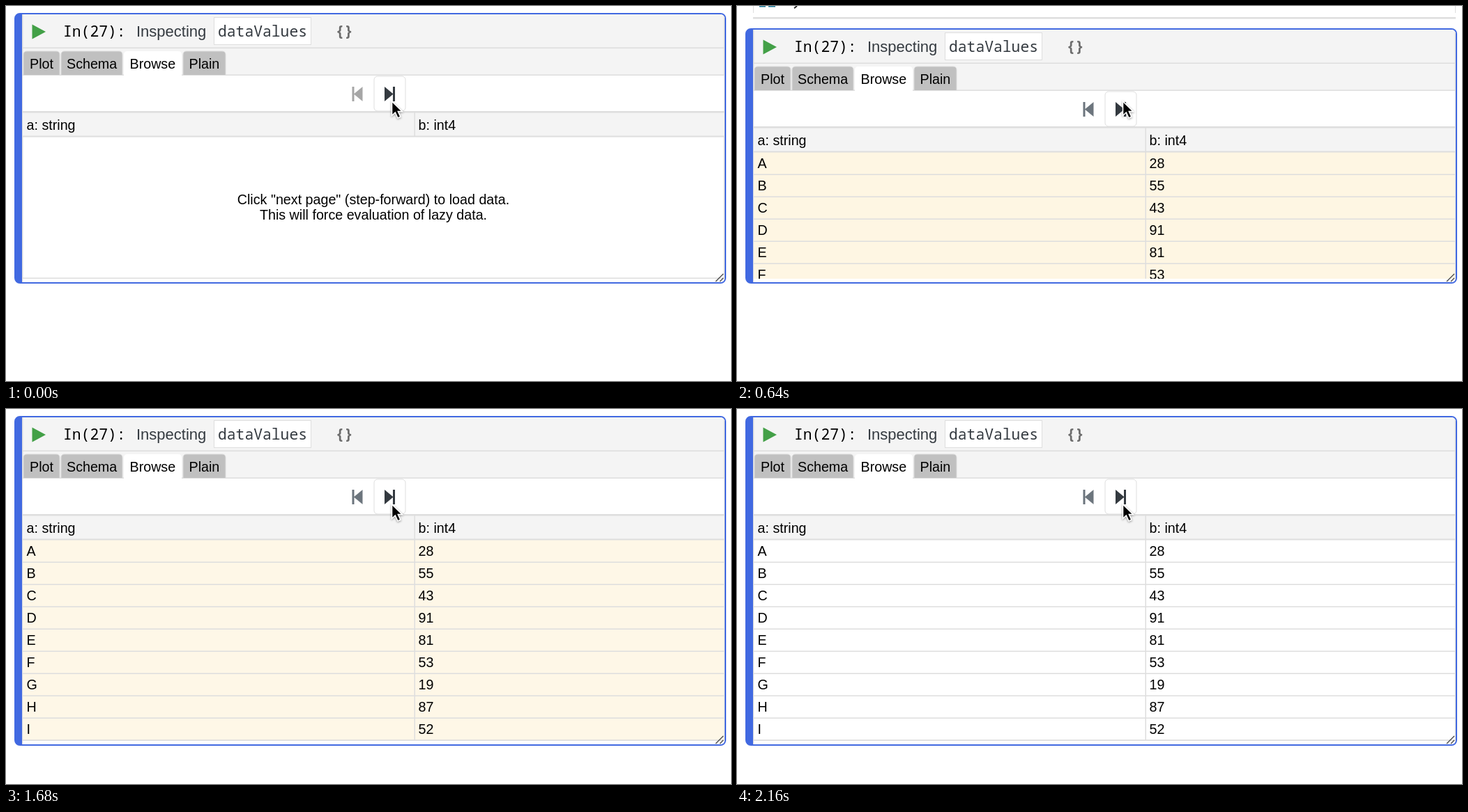
Write an HTML page that moves like this. It is 1040 px wide and 539 px high and loops after 4160 ms.

```html
<!DOCTYPE html>
<html lang="en">
<head>
<meta charset="utf-8">
<title>Data browser</title>
<style>
html, body { margin: 0; width: 100%; height: 100%; overflow: hidden; background: #fff; }
svg { position: absolute; left: 0; top: 0; font: 19.7px "Liberation Sans", Arial, sans-serif; }
#card {
  position: absolute; left: 12px; top: 10px; width: 1021px; box-sizing: border-box;
  border: 2px solid #4169e1; border-left-width: 11px; border-radius: 8px;
  overflow: hidden; background: #fff;
}
#card svg { left: -23px; top: -12px; }
.mono { font: 21.33px "Noto Sans Mono", "DejaVu Sans Mono", monospace; }
.line { fill: #dedede; }
.bar { fill: #f4f4f4; }
.dark { fill: #343a40; }
</style>
</head>
<body>
<svg id="above" width="1040" height="30">
  <path d="M23.5 0V10M1030.5 0V10" stroke="#ddd"/>
  <rect class="line" x="23" y="16" width="1008" height="2.5"/>
  <path d="M32 0H41M45 0H55" stroke="#1f7a99" stroke-width="3"/>
  <path d="M87 -3Q86 1 82 3" fill="none" stroke="#222" stroke-width="2"/>
</svg>

<div id="card"><svg width="1040" height="539">
  <rect class="bar" x="23" y="12" width="1010" height="88"/>
  <rect class="line" x="23" y="12" width="1.5" height="480"/>
  <rect class="line" x="1029.5" y="12" width="1.5" height="480"/>
  <rect class="line" x="23" y="59.5" width="1010" height="1.5"/>
  <path d="M37.5 26.5L57 37L37.5 47.5Z" fill="#43a047"/>
  <text class="mono" x="82" y="44">In(27):</text>
  <text class="dark" x="187" y="44" font-size="22">Inspecting</text>
  <rect x="298.5" y="16.5" width="139" height="39" fill="#fff" stroke="#dedede"/>
  <text class="mono dark" x="304" y="44">dataValues</text>
  <text class="mono" x="472.5" y="43" fill="#6c6c6c" style="font-weight:600">{}</text>

  <rect x="24" y="100" width="1006" height="53" fill="#fff"/>
  <rect class="line" x="23" y="98.5" width="1010" height="1.5"/>
  <g id="tabs"></g>

  <path id="back" d="M496.5 116H499.5V126L511.5 116V137L499.5 127V137H496.5Z"/>
  <rect id="button" x="528" y="101" width="45" height="50" rx="5"/>
  <path class="dark" d="M543 116L555 126V116H558V137H555V127L543 137Z"/>

  <rect class="bar" x="24" y="153" width="1006" height="35"/>
  <rect class="line" x="23" y="151" width="1010" height="2.5"/>
  <rect class="line" x="585.5" y="153" width="1.5" height="35"/>
  <text x="29.5" y="177.5">a: string</text>
  <text x="591.5" y="177.5">b: int4</text>

  <g id="hint" text-anchor="middle">
    <text x="527" y="285">Click "next page" (step-forward) to load data.</text>
    <text x="527" y="307">This will force evaluation of lazy data.</text>
  </g>
  <g id="rows"><rect id="tint" x="24.5" y="188" width="1005" height="288"/></g>
  <rect class="line" x="23" y="186.5" width="1010" height="2"/>

  <g id="foot">
    <rect x="24" y="-7" width="1006" height="9" fill="#fff"/>
    <rect id="edge" x="24" y="-8.5" width="1006" height="1.5" fill="#dedede"/>
    <path d="M1018 -3L1029 -14M1024 -3L1029 -8" stroke="#444" stroke-width="1.3"/>
  </g>
</svg></div>

<svg width="1040" height="539">
  <path d="M553.5 137V157.5L558.3 153L562 161L566 159.3L562.4 151.6H568.5Z"
    stroke="#fff" stroke-width="1.6" style="filter:drop-shadow(0 1.5px 1.5px #0006)"/>
</svg>

<script>
const $ = id => document.getElementById(id);

const tabs = [["Plot", 25, 77, 34], ["Schema", 79, 167, 87], ["Browse", 169, 252, 177.5], ["Plain", 254, 315, 262.5]];
$("tabs").innerHTML = tabs.map(([name, left, right, x]) => {
  const open = name === "Browse";
  return `<path d="M${left} ${open ? 101 : 99}V70Q${left} 65 ${left + 5} 65H${right - 5}Q${right} 65 ${right} 70V${open ? 101 : 99}"
    fill="${open ? "#fff" : "#c0c0c0"}" stroke="${open ? "none" : "#dadada"}"/><text x="${x}" y="90">${name}</text>`;
}).join("");

$("rows").innerHTML += [28, 55, 43, 91, 81, 53, 19, 87, 52].map((value, i) => {
  const y = 188 + i * 32;
  return `<rect class="line" x="24" y="${y + 31.5}" width="1006" height="1.5"/>
    <text x="29.5" y="${y + 22.8}">${"ABCDEFGHI"[i]}</text><text x="591.5" y="${y + 22.8}">${value}</text>`;
}).join("") + '<rect class="line" x="585.5" y="188" width="1.5" height="288"/>';

const show = (id, on) => $(id).style.display = on ? "" : "none";
const mix = (from, to, p) => `rgb(${from.map((v, i) => Math.round(v + (to[i] - v) * p))})`;
const white = [255, 255, 255];

function draw(time) {
  const t = time % 4160;
  const loaded = t >= 640;
  const shifted = loaded && t < 720;
  const press = loaded || t < 480 ? 0 : t < 560 ? 0.5 : 1;
  const fade = Math.max(0, Math.min(1, (Math.floor((t - 1680) / 80) + 1) / 7));
  const top = shifted ? 32 : 10;
  const bottom = t < 720 ? 399 : 484;

  $("card").style.top = top + "px";
  $("card").style.height = bottom - top + "px";
  $("foot").setAttribute("transform", `translate(0 ${bottom - top + 10})`);
  show("above", shifted);
  show("hint", !loaded);
  show("rows", loaded);
  show("edge", !shifted);
  $("back").style.fill = loaded ? "#6c757d" : "#a6a6a6";
  $("button").style.fill = mix(white, [192, 192, 192], press);
  $("button").style.stroke = mix([222, 222, 222], [168, 168, 168], press);
  $("tint").style.fill = mix([254, 246, 227], white, fade);
}

function tick(now) {
  draw(now);
  requestAnimationFrame(tick);
}
draw(0);
requestAnimationFrame(tick);
</script>
</body>
</html>
```
